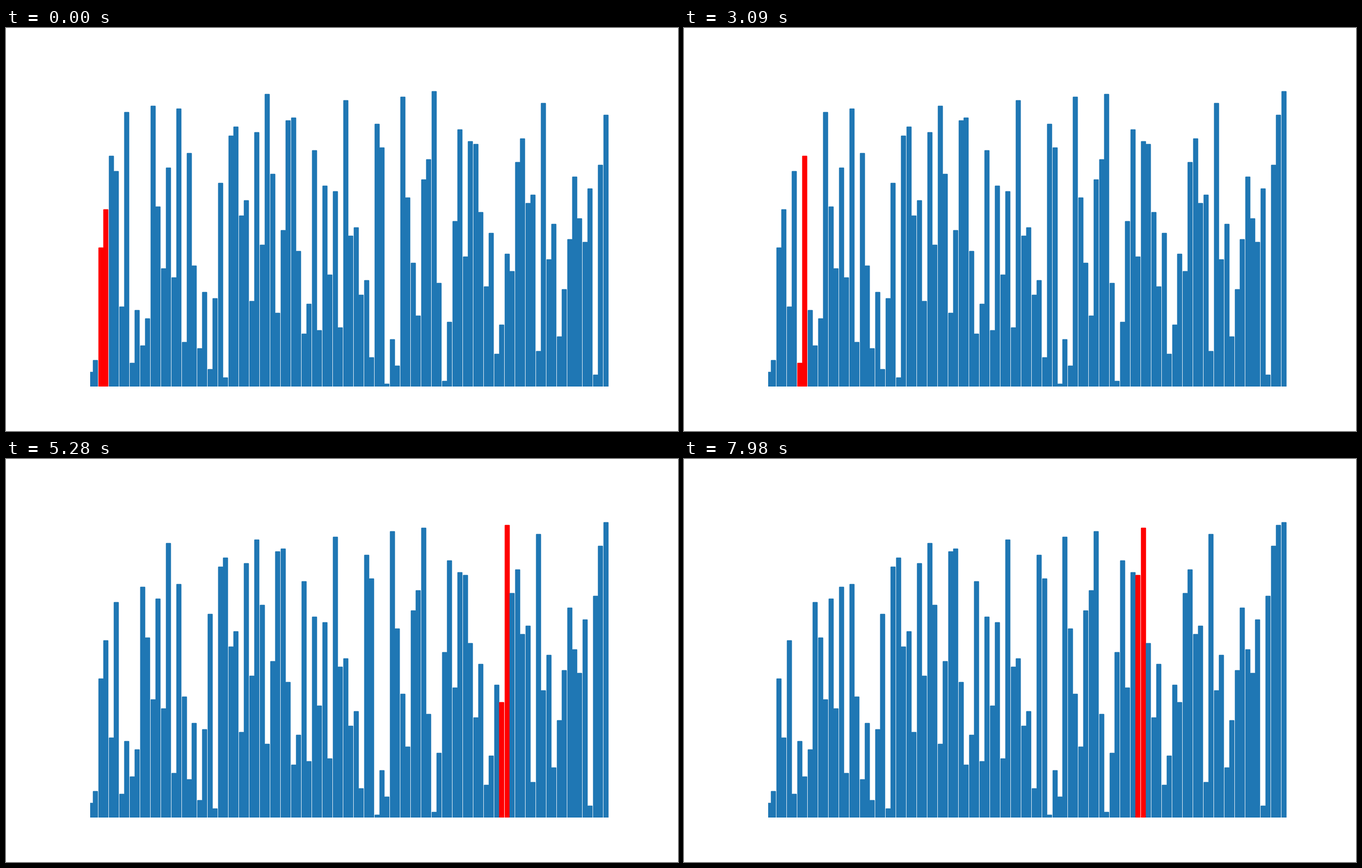
A matplotlib script that plays this animation: 966x580 px, repeating every 8000 ms.

```python
import matplotlib.pyplot as plt
from matplotlib.animation import FuncAnimation

LOOP_MS = 8000
STEPS = 267
FIRST = 2  # the loop opens on this comparison of the first pass
BLUE, RED = "#1f77b4", "#ff0000"

START = [
    5, 9, 47, 60, 78, 73, 27, 93, 8, 26, 14, 23, 95, 61, 40, 74, 37, 94, 15, 79,
    41, 13, 32, 6, 30, 69, 3, 85, 88, 58, 63, 29, 86, 48, 99, 72, 25, 53, 90, 91,
    46, 18, 28, 80, 19, 68, 38, 66, 20, 97, 51, 54, 31, 36, 10, 89, 81, 1, 16, 7,
    98, 64, 42, 24, 70, 77, 100, 35, 2, 22, 56, 87, 44, 83, 82, 59, 34, 52, 11, 21,
    45, 39, 76, 84, 62, 65, 12, 96, 43, 55, 17, 33, 50, 71, 57, 49, 67, 4, 75, 92,
]
N = len(START)


def bubble_steps(values, first):
    """Yield the compared index and the values after each comparison."""
    a = list(values)
    for last in range(N - 1, 0, -1):
        for j in range(first, last):
            if a[j] > a[j + 1]:
                a[j], a[j + 1] = a[j + 1], a[j]
            yield j, list(a)
        first = 0


steps = [step for step, _ in zip(bubble_steps(START, FIRST), range(STEPS))]

fig, ax = plt.subplots(figsize=(9.66, 5.8), dpi=100, facecolor="white")
fig.subplots_adjust(left=0.125, right=0.9, bottom=0.11, top=0.88)
ax.axis("off")
bars = ax.bar(range(N), START, width=0.8, linewidth=1)
ax.set_xlim(0, N)
ax.set_ylim(0, 1.05 * max(START))


def draw(frame):
    j, values = steps[frame]
    for i, (bar, value) in enumerate(zip(bars, values)):
        bar.set_height(value)
        bar.set_color(RED if i in (j, j + 1) else BLUE)
    return bars.patches


anim = FuncAnimation(fig, draw, frames=STEPS, init_func=lambda: draw(0),
                     interval=LOOP_MS / STEPS, repeat=True, repeat_delay=0,
                     blit=False)
plt.show()
```
